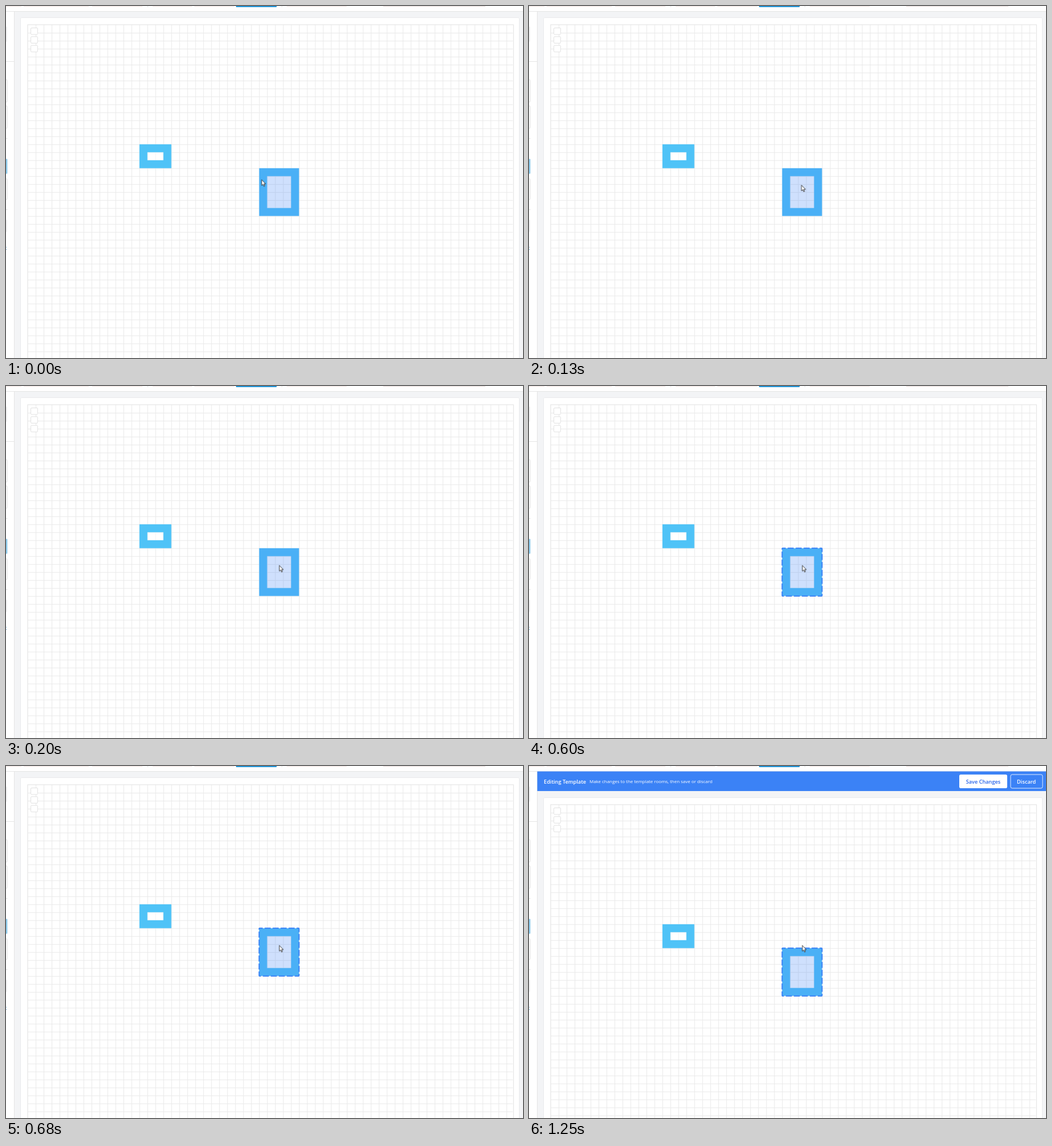
Recreate the animation shown at these times as an HTML page. Size 906 by 618 pixels, loop 1.6 s.

```html
<!DOCTYPE html>
<html lang="en">
<head>
<meta charset="utf-8">
<title>Room template editor</title>
<style>
  html, body { margin: 0; width: 100%; height: 100%; overflow: hidden; background: #fff; }
  svg { display: block; width: 906px; height: 618px; }
  text { font: 600 9.2px "Open Sans", "Noto Sans", sans-serif; fill: #fff; }
  .hint { font-size: 7.91px; font-weight: 400; }
  .middle { text-anchor: middle; }
  .edge { fill: #fff; stroke: #e2e2e2; }
  .rule { fill: #e4e4e4; }
  .chip { fill: #f3e4e1; }
  .grid { stroke: #e9e9e9; stroke-dasharray: 1 13; }
  .room { stroke-width: 14; }

  #pointer, #canvas, #selection, #banner { animation: 1600ms step-end infinite; }
  #pointer { animation-name: point; }
  #canvas { animation-name: push; }
  #selection { animation-name: select; }
  #banner { animation-name: open; }
  @keyframes point {
    0% { transform: translate(448px, 304.5px); }
    4.375% { transform: translate(463px, 309px); }
    8.125% { transform: translate(477.5px, 314px); }
    12.5%, 100% { transform: translate(479px, 314.5px); }
  }
  @keyframes push {
    0% { transform: none; }
    45.625%, 100% { transform: translateY(35px); }
  }
  @keyframes select {
    0% { visibility: hidden; }
    37.5%, 100% { visibility: visible; }
  }
  @keyframes open {
    0% { visibility: hidden; }
    45.625%, 100% { visibility: visible; }
  }
</style>
</head>
<body>
<svg viewBox="0 0 906 618">
  <rect x="15" y="10" width="891" height="608" fill="#f3f4f6"/>

  <g id="canvas">
    <rect class="edge" x="25.5" y="20.5" width="874" height="640" rx="2" style="stroke:#e9eaec"/>
    <rect x="38" y="32.9" width="851.3" height="640" fill="none" stroke="#e0e0e0"/>

    <!-- Grid cells are 14 units; thick dashed strokes draw the lines -->
    <g transform="translate(38 33) scale(.999)">
      <path class="grid" d="M14 300H851" stroke-width="600"/>
      <path class="grid" d="M425.5 14V600" stroke-width="851"/>
      <rect class="room" x="203" y="217" width="42" height="28" fill="#fff" fill-opacity=".5" stroke="#4fc3f7"/>
      <rect class="room" x="413" y="259" width="56" height="70" fill="#3b82f6" fill-opacity=".245" stroke="#4ab0f6"/>
      <rect id="selection" x="406" y="252" width="70" height="84" rx="1" fill="none"
        stroke="#3b82f6" stroke-width="2" stroke-dasharray="10.5 3.5" stroke-dashoffset="5.25"/>
    </g>

    <g class="edge">
      <rect x="43.5" y="38.5" width="12" height="11.5" rx="1.5"/>
      <rect x="43.5" y="53.8" width="12" height="11.5" rx="1.5"/>
      <rect x="43.5" y="69.2" width="12" height="11.5" rx="1.5"/>
    </g>
  </g>

  <!-- Toolbar and side panel -->
  <rect width="906" height="9" fill="#fff"/>
  <g class="chip">
    <rect width="27" height="1"/>
    <rect x="31" width="114" height="1"/>
    <rect x="151" width="88" height="1"/>
    <rect x="257" width="69" height="1"/>
    <rect x="330" width="70" height="1"/>
    <rect x="492" width="105" height="1"/>
    <rect x="661" width="179" height="1" fill="#e8dbd8"/>
  </g>
  <path d="M403 0H474.4V1Q474.4 2 473.4 2H404Q403 2 403 1Z" fill="#2196d9"/>
  <g class="rule">
    <rect x="248" width="1" height="2"/>
    <rect x="483" width="1" height="2"/>
    <rect y="9" width="906" height="1"/>
    <rect x="14" y="10" width="1" height="608"/>
    <rect y="97" width="14" height="1"/>
    <rect y="232" width="2.5" height="1"/>
    <rect y="357" width="2.5" height="1"/>
  </g>
  <g fill="#f1f1f2">
    <rect x="-8" y="36" width="10" height="27" rx="2"/>
    <rect x="-8" y="375" width="10" height="22" rx="2"/>
  </g>
  <g class="edge">
    <rect x="-8.5" y="129.5" width="10.5" height="39" rx="1"/>
    <rect x="-8.5" y="175.5" width="10.5" height="39" rx="1"/>
    <rect x="-8.5" y="303.5" width="10.5" height="36" rx="1"/>
  </g>
  <rect x="-8" y="268.5" width="10.4" height="26" rx="1" fill="#8dcaec"/>
  <text x="-1.8" y="427.5" style="fill:#2b8fd0;font-weight:400">t</text>

  <g id="banner">
    <rect x="14.5" y="9.5" width="892" height="34.5" fill="#3b82f6"/>
    <text x="26" y="30.5">Editing Template</text>
    <text class="hint" x="106" y="30">Make changes to the template rooms, then save or discard</text>
    <rect x="754" y="15" width="84" height="24" rx="2.8" fill="#fff"/>
    <text class="middle" x="796" y="30.5" style="fill:#2563eb">Save Changes</text>
    <rect x="844" y="15" width="56" height="24" rx="2.8" fill="none" stroke="#fff" stroke-opacity=".85"/>
    <text class="middle" x="871.7" y="30.5">Discard</text>
  </g>

  <path id="pointer" d="M0 .5V10.6L2.3 8.5L3.9 12.1L5.5 11.4L3.9 7.9H7.1Z"
    fill="#fff" stroke="#222" stroke-width=".9" stroke-linejoin="round"/>
</svg>
</body>
</html>
```
